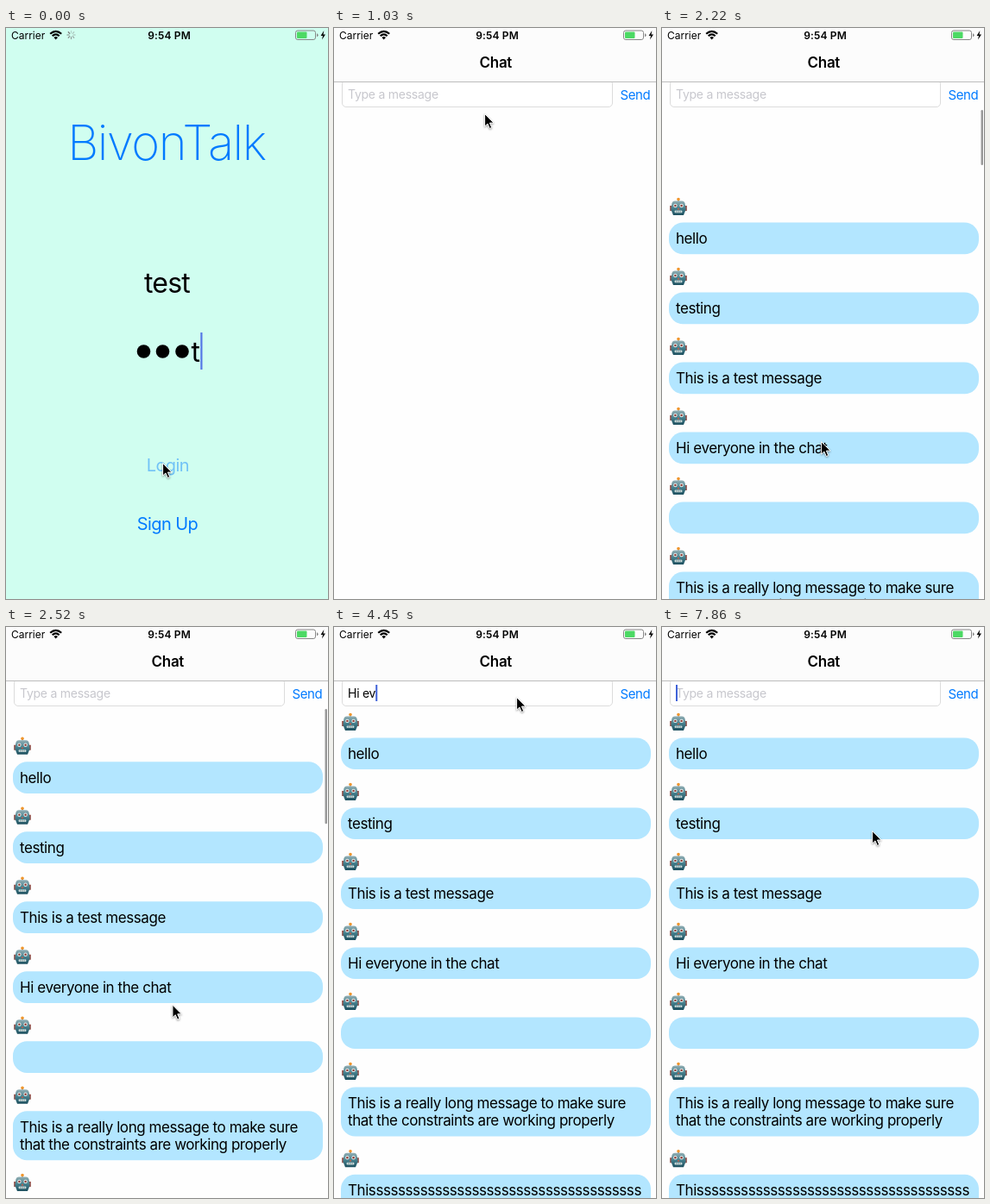
These frames come from a looping animation (373 by 662 pixels, 8 s). An HTML page:

```html
<!DOCTYPE html>
<html lang="en">
<head>
<meta charset="utf-8">
<title>Chat login</title>
<style>
  html, body { margin: 0; width: 100%; height: 100%; overflow: hidden; background: #fff; }
  svg { display: block; }
  text { font-family: Inter, Roboto, sans-serif; font-size: 17px; letter-spacing: -.43px; white-space: pre; }
  .mid { text-anchor: middle; }
  .title { font-size: 56px; font-weight: 200; letter-spacing: -1.4px; }
  .button { font-size: 20px; letter-spacing: -.6px; }
  .entry { font-size: 32px; letter-spacing: -.8px; }
  .field { font-size: 14px; letter-spacing: -.25px; }
  .status { font-size: 12px; letter-spacing: 0; }
  .blue { fill: #007aff; }
</style>
</head>
<body>
<svg width="373" height="662" viewBox="0 0 373 662">
  <defs>
    <linearGradient id="metal" x2="0" y2="1">
      <stop offset="0" stop-color="#92aeb4"/>
      <stop offset=".5" stop-color="#46818e"/>
      <stop offset="1" stop-color="#1d4f5e"/>
    </linearGradient>
    <g id="robot">
      <path d="M0-7V-9" stroke="#777" stroke-width="2"/>
      <circle cy="-9" r="1.8" fill="#f0962e"/>
      <path d="M-9.8-1.5h3v6h-3zM6.8-1.5h3v6h-3z" fill="#8f4a44"/>
      <path d="M-7.6-4Q-7-7-4-7H4Q7-7 7.6-4L8.6 3 6 9.4H-6L-8.6 3Z" fill="url(#metal)"/>
      <circle cx="-3.6" cy="-1.6" r="2.2" fill="#e4eeee"/>
      <circle cx="3.6" cy="-1.6" r="2.2" fill="#e4eeee"/>
      <circle cx="-3.6" cy="-1.6" r="1.2" fill="#8f3a32"/>
      <circle cx="3.6" cy="-1.6" r="1.2" fill="#8f3a32"/>
      <path d="M0 .6 1.4 2.8H-1.4Z" fill="#d3583f"/>
      <rect x="-4.4" y="4" width="8.8" height="2.6" rx="1" fill="#cfdfdf"/>
      <path d="M-2.2 4v2.6M0 4v2.6M2.2 4v2.6" stroke="#45636b" stroke-width=".6"/>
    </g>
  </defs>

  <g id="login">
    <rect width="373" height="662" fill="#d0fef0"/>
    <text class="title blue mid" x="186" y="153">BivonTalk</text>
    <text class="entry mid" x="186.5" y="307">test</text>
    <circle cx="159.5" cy="375" r="7.8"/>
    <circle cx="181.5" cy="375" r="7.8"/>
    <circle cx="204" cy="375" r="7.8"/>
    <text class="entry" x="214.5" y="387">t</text>
    <rect x="225.3" y="353" width="2.2" height="43" fill="#5577e6"/>
    <text id="loginButton" class="button blue mid" x="187.3" y="514">Login</text>
    <text class="button blue mid" x="187" y="582">Sign Up</text>
  </g>

  <g id="chat">
    <rect width="373" height="662" fill="#fefefe"/>
    <g id="list"></g>
    <rect id="scrollbar" x="369.5" y="95" width="2.5" rx="1.25" fill="#999"/>
    <rect x="9.5" y="60.5" width="313" height="31" rx="4.5" fill="#fff" stroke="#dcdcdc"/>
    <rect width="373" height="62" fill="#fcfcfc"/>
    <path d="M0 62.5H373" stroke="#bcbcbc"/>
    <text class="mid" x="187.3" y="46" font-weight="600" style="letter-spacing:-.3px">Chat</text>
    <text id="hint" class="field" x="16" y="81.5" fill="#c7c7cd">Type a message</text>
    <text id="typed" class="field" x="16" y="81.5"></text>
    <rect id="caret" y="67" width="2" height="19" fill="#3f62d8"/>
    <text id="send" class="blue" x="331.5" y="82.5" style="font-size:15px;letter-spacing:-.4px">Send</text>
  </g>

  <g id="statusBar">
    <text class="status" x="6" y="12.5">Carrier</text>
    <g fill="none" stroke="#000" stroke-width="2.2">
      <path d="M51.2 6.8Q57.7 .9 64.2 6.8"/>
      <path d="M53.7 9.3Q57.7 5.6 61.7 9.3"/>
    </g>
    <path d="M55.4 11Q57.7 9 60 11L57.7 13.4Z"/>
    <g id="spinner" stroke="#777" stroke-width="1.2" stroke-linecap="round"></g>
    <text class="status mid" x="189" y="12.5" font-weight="600" style="letter-spacing:.15px">9:54 PM</text>
    <rect x="335.5" y="3" width="23" height="10.5" rx="2.4" fill="none" stroke="#858585"/>
    <rect x="337" y="4.5" width="11.5" height="7.5" rx="1" fill="#4cd964"/>
    <path d="M360 6.3q1.6 .4 1.6 2t-1.6 2z" fill="#858585"/>
    <path d="M368.3 3 364.6 9H367L366 13.4 370 7.4H367.5Z"/>
  </g>

  <path id="mouse" d="M.6 .5V15.1L3.9 12 6.3 17.5 8.7 16.5 6.4 11.1H11Z"
        stroke="#fff" stroke-width="1" style="filter:drop-shadow(0 1px 1px #0006)"/>
</svg>

<script>
const LOOP = 8000, STEP = LOOP / 54;
const TOP_GAP = 18, LINE = 20.3;            // avatar above bubble, text line height
const VIEW = 567, BAR = 161;                // message list viewport and scrollbar
const GRAB = 266, DRAG = 1953, RELEASE = 2370;
const DRAFT = 'Hi everyone in the chat';

const MESSAGES = [
  ['hello'], ['testing'], ['This is a test message'], ['Hi everyone in the chat'], [''],
  ['This is a really long message to make sure', 'that the constraints are working properly'],
  ['Thi' + 's'.repeat(37), 's'.repeat(37)]
];

// Keys: time, then values
const MOUSE = [
  [0, 181, 504], [450, 181, 504], [1030, 174, 99], [1190, 174, 99], [1330, 194, 157],
  [1490, 194, 157], [1926, 183, 245], [2222, 184, 479], [2400, 186, 520], [2960, 216, 131],
  [3300, 211, 81], [6430, 211, 81], [7000, 343, 79], [7580, 343, 79], [7852, 243, 236]
];
const TYPING = [[4140, 1], [5180, 16], [5920, 20], [6215, 23]];
const BUSY = [[0, 440], [1180, 1320], [2810, 3110], [3180, 3400], [4180, 4430],
              [5180, 5400], [7180, 7400], [7650, 7800]];

const $ = id => document.getElementById(id);
const clamp = v => Math.max(0, Math.min(1, v));
const within = (t, a, b) => t >= a && t < b;
const show = (id, alpha) => $(id).setAttribute('opacity', +alpha);
const move = (id, x, y) => $(id).setAttribute('transform', `translate(${x} ${y})`);

function track(keys, t) {
  const i = keys.findIndex(k => k[0] > t);
  if (i < 0) return keys[keys.length - 1].slice(1);
  if (i === 0) return keys[0].slice(1);
  const a = keys[i - 1], b = keys[i], p = (t - a[0]) / (b[0] - a[0]);
  return a.slice(1).map((v, j) => v + (b[j + 1] - v) * p);
}

function buildList() {
  let y = 128.5, html = '';
  for (const lines of MESSAGES) {
    const height = 16.3 + LINE * lines.length;
    html += `<use href="#robot" x="19" y="${y - TOP_GAP}"/>
      <rect x="8" y="${y}" width="359" height="${height}" rx="16.5" fill="#b3e6ff"/>`;
    lines.forEach((line, i) => {
      html += `<text x="16" y="${y + 24.5 + LINE * i}">${line}</text>`;
    });
    y += height + 44.4;
  }
  $('list').innerHTML = html;
}

function buildSpinner() {
  for (let i = 0; i < 8; i++) {
    $('spinner').innerHTML +=
      `<path d="M0-2.4V-4.6" transform="rotate(${i * 45})" opacity="${.3 + i * .1}"/>`;
  }
}

// Rubber-band pull, then a damped return
function pull(t) {
  if (t < DRAG || t > 2900) return 0;
  const drag = Math.max(0, track(MOUSE, Math.min(t, RELEASE))[1] - GRAB);
  const offset = VIEW * (1 - 1 / (drag * .55 / VIEW + 1));
  const k = Math.max(0, t - RELEASE) * .018;
  return offset * (1 + k) * Math.exp(-k);
}

function draw(t) {
  show('loginButton', t < 140 ? .45 : 1);
  const slide = clamp((t - 420) / 500);
  move('chat', 0, 662 * (1 - slide) ** 4);

  const offset = pull(t);
  show('list', t >= 1620);
  move('list', 0, offset);
  $('scrollbar').setAttribute('height', BAR - offset);
  show('scrollbar', t < DRAG ? 0 : 1 - clamp((t - 3000) / 300));

  const count = within(t, 4140, 7700) ? Math.floor(track(TYPING, t)[0]) : 0;
  $('typed').textContent = DRAFT.slice(0, count);
  show('hint', !count);
  $('caret').setAttribute('x', 16 + (count ? $('typed').getComputedTextLength() : 0));
  show('caret', t >= 3850 && !within(t, 6750, 7150));
  show('send', within(t, 7500, 7700) ? .3 : 1);

  show('spinner', BUSY.some(([a, b]) => within(t, a, b)));
  $('spinner').setAttribute('transform', `translate(75.5 8) rotate(${Math.floor(t / 100) * 45})`);
  move('mouse', ...track(MOUSE, t));
}

// The screen advances in even steps
function tick(now) {
  draw(Math.floor((now % LOOP + 8) / STEP) % 54 * STEP);
  requestAnimationFrame(tick);
}

buildList();
buildSpinner();
draw(0);
requestAnimationFrame(tick);
</script>
</body>
</html>
```
